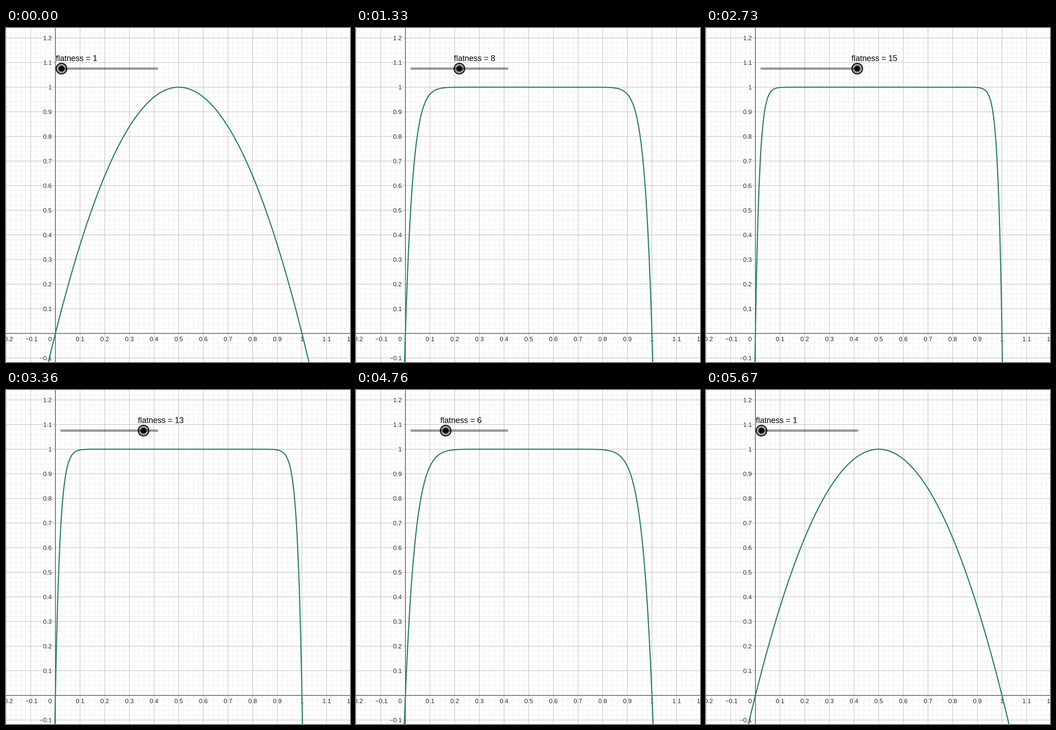
Recreate the animation shown at these times as a matplotlib script. Size 759 by 738 pixels, loop 5740 ms.

```python
import numpy as np
import matplotlib.pyplot as plt
from matplotlib.animation import FuncAnimation
from matplotlib.patches import Circle
from matplotlib.patheffects import withStroke

W, H, DPI = 759, 738, 128
PT = 72 / DPI            # points per pixel
FRAMES, INTERVAL = 82, 70

X0, Y0 = 109, 674.8      # axis origin in pixels
UNIT = 544               # pixels per unit
TRACK_X, TRACK_Y, STEP = 122.4, 89.8, 15.09
GREEN = "#2a7f6e"

# Frames at which the slider moves up, then back down
UP = [1, 4, 6, 9, 12, 14, 17, 20, 22, 25, 28, 31, 34, 37]
DOWN = [43, 46, 49, 52, 54, 57, 60, 63, 66, 69, 72, 74, 77, 80]

plt.rcParams["font.family"] = "Liberation Sans"
fig = plt.figure(figsize=(W / DPI, H / DPI), dpi=DPI, facecolor="white")
ax = fig.add_axes([0, 0, 1, 1])
ax.set_xlim(0, W)
ax.set_ylim(H, 0)
ax.axis("off")


def px(x):
    return X0 + UNIT * x


def py(y):
    return Y0 - UNIT * y


def cross(value, color, width, z):
    style = dict(color=color, lw=width * PT, zorder=z, snap=False)
    ax.axvline(px(value), **style)
    ax.axhline(py(value), **style)


def grid(step, color, width, z):
    for i in range(-round(0.3 / step), round(1.3 / step) + 1):
        cross(i * step, color, width, z)


def tick_text(value):
    return f"{value:.1f}".replace(".0", "").replace("-", "\u2212")


def tick(x, y, text, ha):
    ax.text(x, y + 4.9, text, ha=ha, va="baseline", fontsize=13.7 * PT,
            color="#222222", zorder=4, clip_on=True,
            path_effects=[withStroke(linewidth=3 * PT, foreground="white")])


grid(0.02, "#efefef", 1, 1)
grid(0.1, "#c6c6c6", 1.2, 2)
cross(0, "#383838", 1.2, 3)

for i in range(-2, 13):
    if i:
        shift = 1.5 if i < 0 else 0
        tick(px(i / 10) + shift, 687, tick_text(i / 10), "center")
        if i > -2:
            tick(101, py(i / 10), tick_text(i / 10), "right")
tick(101, 687, "0", "right")

xs = np.linspace(-0.05, 1.05, 1200)
curve, = ax.plot([], [], color=GREEN, lw=2.5 * PT, zorder=5,
                 solid_joinstyle="round", snap=False)

ax.plot([TRACK_X, TRACK_X + 14 * STEP], [TRACK_Y, TRACK_Y], color="black",
        alpha=0.4, lw=5 * PT, solid_capstyle="round", zorder=6, snap=False)
knob = [
    Circle((0, 0), 12, fc=(0, 0, 0, 0.4), ec="none", zorder=7),
    Circle((0, 0), 11.8, fc="none", ec="black", lw=2 * PT, zorder=8),
    Circle((0, 0), 6.3, fc="black", ec="none", zorder=8),
]
for part in knob:
    ax.add_patch(part)
label = ax.text(0, 73.3, "", fontsize=17.8 * PT, color="black",
                va="baseline", zorder=9)


def flatness(frame):
    ups = sum(frame >= f for f in UP)
    downs = sum(frame >= f for f in DOWN)
    return 1 + ups - downs


def update(frame):
    n = flatness(frame)
    curve.set_data(px(xs), py(1 - (2 * xs - 1) ** (2 * n)))
    x = TRACK_X + STEP * (n - 1)
    for part in knob:
        part.center = (x, TRACK_Y)
    label.set_x(x - 12.2)
    label.set_text(f"flatness = {n}")
    return [curve, label, *knob]


anim = FuncAnimation(fig, update, frames=FRAMES, interval=INTERVAL,
                     repeat=True, blit=False)
plt.show()
```
